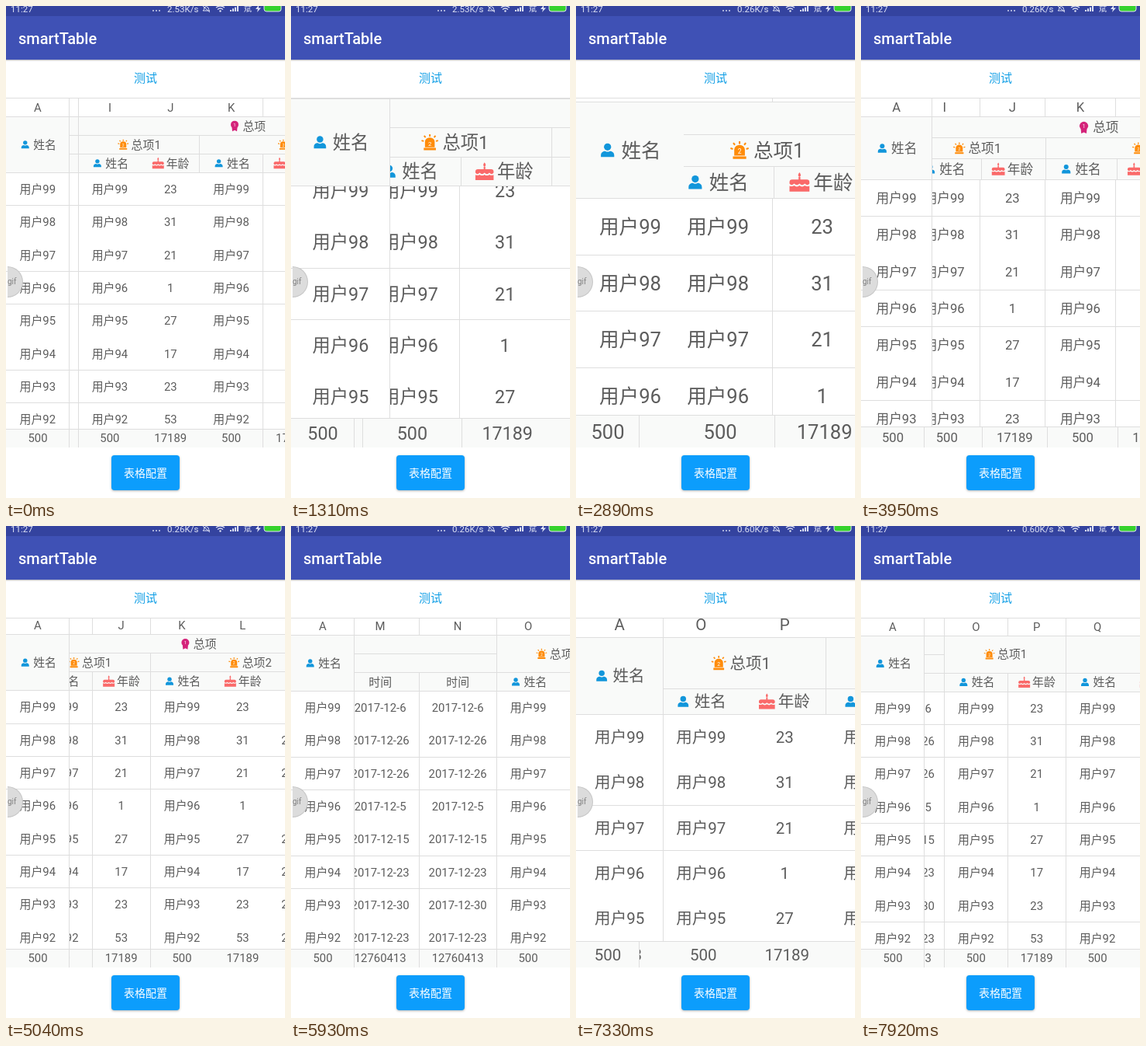
An HTML page with a canvas that plays this animation: 360 px wide and 633 px high, repeating every 8 s.

```html
<!DOCTYPE html>
<html lang="zh">
<head>
<meta charset="utf-8">
<title>smartTable</title>
<style>
  html, body { margin: 0; width: 360px; height: 633px; overflow: hidden; background: #fff; }
  canvas { display: block; }
</style>
</head>
<body>
<canvas id="stage" width="360" height="633"></canvas>
<script>
const g = document.getElementById('stage').getContext('2d');
const FONT = 'Roboto, "Noto Sans CJK SC", "Noto Sans CJK", sans-serif';
const LOOP = 8000, TOP = 119, BOTTOM = 568;
const ROW = 42.33, HEAD = 24, PIN = 81.5;
const LINE = '#dedede', INK = '#5c5c5c', TINT = '#f9faf9';

// pose: start, end of hold, zoom, left of column I, top of the body
const poses = [
  [0, 660, 1, 93, 214.33],
  [1310, 1400, 1.567, 89.3, 204.45],
  [1490, 1570, 1.64, 92, 210],
  [1580, 1770, 1.66, 95, 215],
  [2350, 2510, 1.74, 107, 238],
  [2890, 2990, 1.7165, 112.9, 247.4],
  [3100, 3370, 1.7, 110, 245],
  [3480, 3620, 1.66, 107, 244],
  [3950, 4040, 1.118, 62, 223.33],
  [4420, 4800, 1, 47, 212.5],
  [5040, 5080, 1, 29.4, 211.67],
  [5180, 5420, 1, 20, 211.67],
  [6220, 6380, 1, -400, 213],
  [6770, 6870, 1.37, -594.9, 245.85],
  [7140, 7220, 1.45, -640, 248],
  [7920, 8000, 1, -406, 213]
];

const ages = [23, 31, 21, 1, 27, 17, 23, 53, 30, 12];
const days = [6, 26, 26, 5, 15, 23, 30, 23, 14, 8];
const kinds = {
  name: { w: 81.8, label: '姓名', icon: 'person', sum: '500', cell: i => '用户' + (99 - i) },
  age: { w: 74.9, label: '年龄', icon: 'cake', sum: '17189', cell: i => ages[i] },
  date: { w: 100, label: '时间', sum: '12760413', cell: i => '2017-12-' + days[i] }
};
const cols = [];
let at = 0;
for (const letter of 'IJKLMNOPQRST') {
  const kind = kinds[['name', 'age', 'name', 'age', 'date', 'date'][cols.length % 6]];
  cols.push({ letter, kind, x: at });
  at += kind.w;
}
const SPAN = cols[6].x;

// group headers: label, icon, centre, first row, row count
const groups = [
  ['总项', 'medal', 218, 0, 1],
  ['总项1', 'siren', 78.4, 1, 1],
  ['总项2', 'siren', 285, 1, 1],
  ['总项1', 'siren', SPAN + 78.4, 0, 2],
  ['总项2', 'siren', SPAN + 285, 0, 2]
];

function box(x, y, w, h, color) {
  g.fillStyle = color;
  g.fillRect(x, y, w, h);
}
function hline(x, y, w) { box(x, Math.floor(y), w, 1, LINE); }
function vline(x, y, h) { box(Math.floor(x), y, 1, h, LINE); }
// thin lines drop out where they fall between pixels
const shown = (v, limit) => v - Math.floor(v) < limit;

function text(s, x, y, size, color = INK, align = 'center', weight = 400) {
  g.font = `${weight} ${size}px ${FONT}`;
  g.textAlign = align;
  g.fillStyle = color;
  g.fillText(s, x, y + size * .36);
}
function disc(x, y, r, color) {
  g.fillStyle = color;
  g.beginPath();
  g.arc(x, y, r, 0, 7);
  g.fill();
}
function shape(d, color) {
  g.fillStyle = color;
  g.fill(new Path2D(d));
}
function stroke(d, color, width) {
  g.strokeStyle = color;
  g.lineWidth = width;
  g.stroke(new Path2D(d));
}

const icons = {
  person() {
    const c = '#1296db';
    disc(0, -2.5, 2.7, c);
    shape('M-5 5V3.700C-5 1.400-3.200 .6-1.800 .6Q0 1.700 1.800 .6C3.200 .6 5 1.400 5 3.700V5Z', c);
  },
  cake() {
    const c = '#fa6a6a';
    shape('M0-7.500Q2-5 0-4Q-2-5 0-7.500M-.7-4H.7V-2H-.7ZM-5.500-2H5.500Q7.500-2 7.500 0V1Q6 3 4 1Q2 3 0 1Q-2 3-4 1Q-6 3-7.500 1V0Q-7.500-2-5.500-2Z', c);
    shape('M-7.500 2.700Q-5.500 3.500-4 2.500Q-2 4 0 2.500Q2 4 4 2.500Q5.500 3.500 7.500 2.700V7H-7.500Z', c);
  },
  siren() {
    const c = '#ff8c0a';
    shape('M-4 4V-.5A4 3.500 0 0 1 4-.5V4ZM-5 4.600H5V6.500H-5Z', c);
    stroke('M0-6.700V-4.700M-4.700-5.500L-3.500-4M4.700-5.500L3.500-4M-6.800-1.500L-5-1M6.800-1.500L5-1', c, 1.2);
    text('2', 0, 1, 5, '#fff');
  },
  medal() {
    const c = '#d4237a';
    shape('M-3.500 2L-3 7L0 5.500L3 7L3.500 2Z', c);
    disc(0, -1.7, 5, c);
    text('1', 0, -1.7, 6, '#fff');
  }
};

function label(s, icon, x, y, z) {
  const center = icon ? x + 2.5 + 6.8 * z : x;
  text(s, center, y, 14.9 * z);
  if (!icon) return;
  const half = g.measureText(s).width / 2;
  g.save();
  g.translate(center - half - 10.4 * z, y);
  g.scale(z, z);
  icons[icon]();
  g.restore();
}

function clipped(x, y, w, h, draw) {
  if (h <= 0) return;
  g.save();
  g.beginPath();
  g.rect(x, y, w, h);
  g.clip();
  draw();
  g.restore();
}

function poseAt(t) {
  let i = poses.length - 1;
  while (poses[i][0] > t) i--;
  const a = poses[i], b = poses[i + 1];
  const k = b ? Math.max(0, (t - a[1]) / (b[0] - a[1])) : 0;
  return [2, 3, 4].map(n => k ? a[n] + (b[n] - a[n]) * k : a[n]);
}

function table(t) {
  const [z, left, body] = poseAt(t);
  const size = 14.9 * z, pin = Math.floor(PIN * z), rest = 360 - pin;
  const rowH = ROW * z, headH = HEAD * z;
  const rawHead = body - 3 * headH;
  const head = Math.max(TOP, rawHead), headEnd = head + 3 * headH;
  const foot = BOTTOM - headH;
  // zooming pushes header and total lines aside a little
  const shift = 3 * Math.min(1, Math.max(0, (z - 1) / .1));
  const mid = c => left + (c.x + c.kind.w / 2) * z;
  const edge = c => left + c.x * z;

  const colLine = (c, y, h, dx = 0) => {
    if (shown(edge(c), .67)) vline(edge(c) + dx, y, h);
  };
  const pinLine = (y, h) => {
    if (shown(PIN * z, .75)) vline(pin, y, h);
  };
  const rowLines = (x, w) => {
    for (let i = 1; i < 10; i++) {
      const y = body + i * rowH;
      if (shown(y, .75)) hline(x, y, w);
    }
  };
  const cells = (kind, x) => {
    for (let i = 0; i < 10; i++) text(kind.cell(i), x, body + (i + .5) * rowH, size);
  };

  // body
  clipped(pin, headEnd, rest, foot - headEnd, () => {
    for (const c of cols) {
      cells(c.kind, mid(c));
      colLine(c, headEnd, foot - headEnd);
    }
    rowLines(pin, rest);
  });
  clipped(0, headEnd, pin + 1, foot - headEnd, () => {
    cells(kinds.name, PIN * z / 2);
    rowLines(0, pin);
    pinLine(headEnd, foot - headEnd);
  });

  // column letters
  const letterY = rawHead - 11.75 * z;
  clipped(pin, TOP, rest, head - TOP, () => {
    for (const c of cols) {
      text(c.letter, mid(c), letterY, size);
      colLine(c, TOP, head - TOP);
    }
  });
  clipped(0, TOP, pin + 1, head - TOP, () => {
    text('A', PIN * z / 2, letterY, size);
    pinLine(TOP, head - TOP);
  });

  // header
  box(0, head, 360, 3 * headH, TINT);
  clipped(pin, head, rest, 3 * headH + 1, () => {
    const next = left + SPAN * z;
    hline(pin, head + headH, next - pin);
    hline(pin, head + 2 * headH, rest);
    cols.forEach((c, i) => {
      label(c.kind.label, c.kind.icon, mid(c), head + 2.5 * headH, z);
      const row = i % 6 === 0 ? 0 : i % 6 === 2 ? (i < 6 ? 1 : 0) : 2;
      // group edges stay solid, like the pinned column's
      if (row < 2 || shown(edge(c), .67))
        vline(edge(c) + shift * .6, head + row * headH, (3 - row) * headH);
    });
    for (const [s, icon, x, row, n] of groups)
      label(s, icon, left + x * z, head + (row + n / 2) * headH, z);
  });
  label('姓名', 'person', PIN * z / 2, head + 1.5 * headH, z);
  pinLine(head, 3 * headH);
  hline(0, head, 360);
  hline(0, headEnd, 360);

  // totals keep an unscaled first cell
  box(0, foot, 360, headH, TINT);
  clipped(81, foot, 279, headH, () => {
    for (const c of cols) {
      text(c.kind.sum, mid(c) + shift, foot + headH / 2, size);
      colLine(c, foot, headH, shift);
    }
  });
  text('500', 41, foot + headH / 2, size);
  vline(81, foot, headH);
  hline(0, foot, 360);
}

function statusBar(t) {
  box(0, 0, 360, 13, '#34439f');
  const c = '#dfe3f5';
  text('11:27', 6, 3.5, 11.5, c, 'left');
  for (const x of [190, 194, 198]) disc(x, 6, .9, c);
  const speed = t < 2520 ? '2.53' : t < 7000 ? '0.26' : '0.60';
  text(speed + 'K/s', 208, 3.5, 11.5, c, 'left');
  stroke('M254 6Q256 5 256 2Q258-1 261 2Q261 5 263 6ZM254 0L263 8', c, 1);
  stroke('M271 2Q276.500-2 282 2M273 4.500Q276.500 1.500 280 4.500', c, 1.3);
  disc(276.5, 6.5, 1.2, c);
  for (let i = 0; i < 4; i++) box(289 + i * 3, 5 - i * 1.7, 2, 2 + i * 1.7, c);
  text('斌', 312, 3.5, 10, c);
  shape('M326-1L322 4H325L324 8L329 2.500H326Z', c);
  g.beginPath();
  g.roundRect(333, -3, 22, 10, 3);
  g.fillStyle = '#35d22b';
  g.fill();
  g.strokeStyle = c;
  g.lineWidth = 1;
  g.stroke();
}

function frame(now) {
  const t = now % LOOP;
  box(0, 0, 360, 633, '#fff');
  box(0, 13, 360, 56, '#3f51b5');
  statusBar(t);
  text('smartTable', 16, 42, 20, '#fff', 'left', 500);
  box(0, 69, 360, 1, '#c8c8cc');
  box(0, 70, 360, 1, '#e9e9eb');
  text('测试', 180, 93, 15, '#129fe6');
  hline(0, 118, 360);
  table(t);

  g.save();
  g.shadowColor = 'rgba(0,0,0,.3)';
  g.shadowBlur = 3;
  g.shadowOffsetY = 1;
  g.fillStyle = '#0c9dfc';
  g.beginPath();
  g.roundRect(136, 578, 88, 45, 4);
  g.fill();
  g.restore();
  text('表格配置', 180, 601, 14, '#fff');

  clipped(2, 335, 21, 41, () => {
    disc(2, 355, 20, '#c6c6c6');
    disc(2, 355, 19, '#dcdcdc');
    text('gif', 2, 354, 10, '#808080', 'left');
  });
  requestAnimationFrame(frame);
}
requestAnimationFrame(frame);
</script>
</body>
</html>
```
